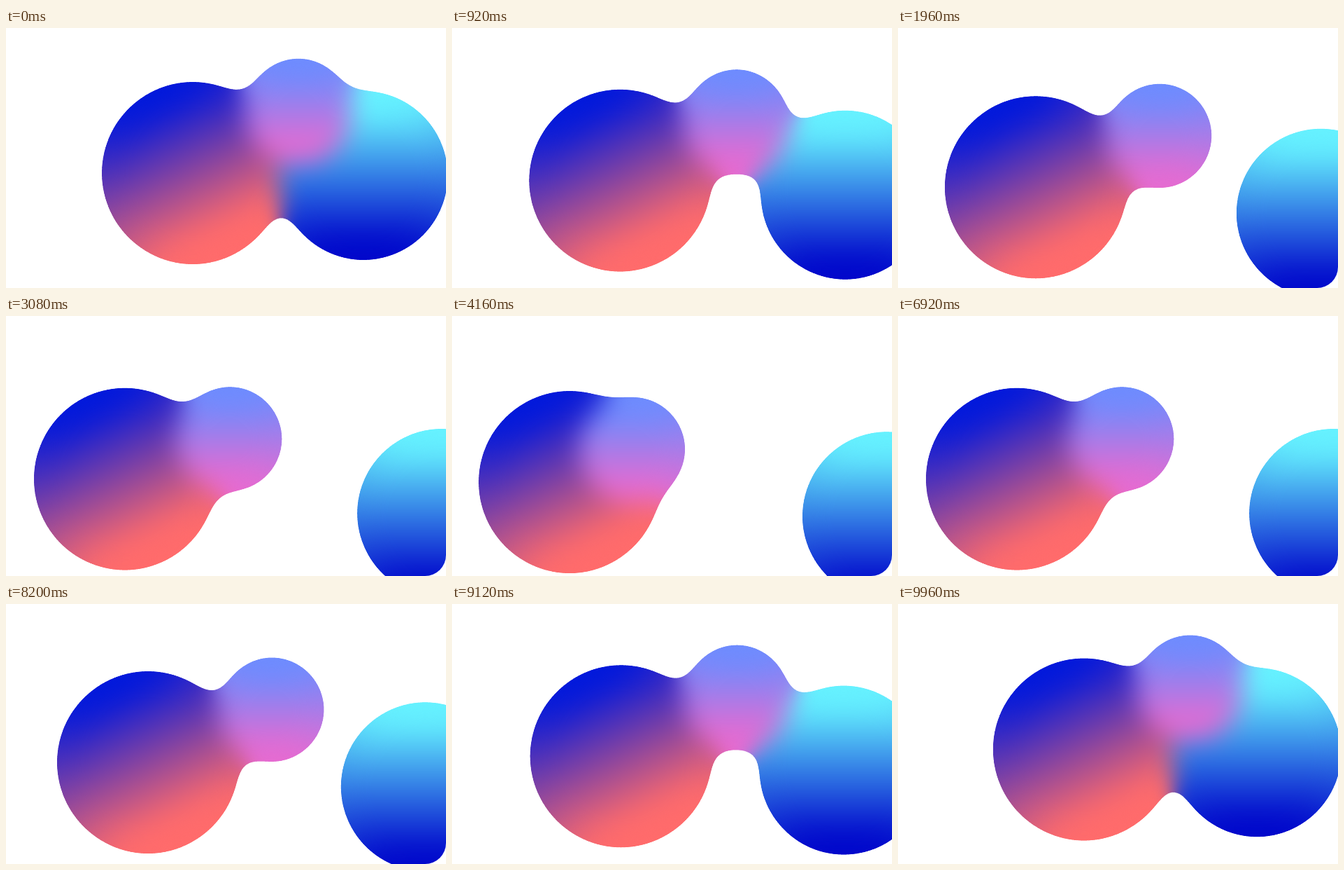
Write an HTML page that moves like this. It is 629 px wide and 371 px high and loops after 10000 ms.

```html
<!DOCTYPE html>
<html lang="en">
<head>
<meta charset="utf-8">
<title>Gooey blobs</title>
<style>
  html, body { margin: 0; width: 100%; height: 100%; overflow: hidden; background: #fff; }
  svg { display: block; width: 100vw; height: 100vh; border-radius: 0 0 30px 0; overflow: hidden; }
</style>
</head>
<body>
<svg viewBox="0 0 629 371">
  <defs>
    <!-- Gradients are in each blob's own coordinates, centred on 0,0 -->
    <linearGradient id="sunset" gradientUnits="userSpaceOnUse" x1="-45" y1="-97" x2="37" y2="79">
      <stop stop-color="#0018dc"/><stop offset="1" stop-color="#ff6b6b"/>
    </linearGradient>
    <linearGradient id="lilac" gradientUnits="userSpaceOnUse" x1="0" y1="-52" x2="0" y2="56">
      <stop stop-color="#6c8cff"/><stop offset="1" stop-color="#e86ad0"/>
    </linearGradient>
    <linearGradient id="ocean" gradientUnits="userSpaceOnUse" x1="0" y1="-92" x2="0" y2="96">
      <stop stop-color="#66f2ff"/><stop offset="1" stop-color="#0006cb"/>
    </linearGradient>
    <!-- Blur, then cut the alpha hard so that near shapes melt together -->
    <filter id="goo" filterUnits="userSpaceOnUse" x="-100" y="-100" width="980" height="620"
            color-interpolation-filters="sRGB">
      <feGaussianBlur stdDeviation="18"/>
      <feColorMatrix values="1 0 0 0 0  0 1 0 0 0  0 0 1 0 0  0 0 0 60 -29.5"/>
    </filter>
  </defs>
  <g filter="url(#goo)">
    <circle id="big" r="131.2" fill="url(#sunset)"/>
    <circle id="right" r="121.8" fill="url(#ocean)"/>
    <circle id="small" r="76.2" fill="url(#lilac)"/>
  </g>
</svg>
<script>
  const LOOP = 10000, STEP = 40;

  // Centre of each blob at every second of the outward half
  const paths = {
    big:   { x: [267, 237.5, 195.5, 171, 167, 179.5],
             y: [207, 218.5, 227.5, 232.3, 236.5, 239] },
    right: { x: [511, 566, 605.5, 622, 622.5, 612.5],
             y: [210.5, 240.5, 265, 280.7, 286, 281] },
    small: { x: [418, 405, 372.5, 324.5, 267, 220],
             y: [118, 135, 154.7, 174, 189, 192] }
  };

  // Catmull-Rom curve through k, with ends extended in a straight line
  function curve(k, s) {
    const last = k.length - 1;
    const at = i => i < 0 ? 2 * k[0] - k[1]
                  : i > last ? 2 * k[last] - k[last - 1] : k[i];
    const i = Math.min(Math.floor(s), last - 1), u = s - i;
    const a = at(i - 1), b = at(i), c = at(i + 1), d = at(i + 2);
    return b + u / 2 * (c - a + u * (2 * a - 5 * b + 4 * c - d + u * (3 * (b - c) + d - a)));
  }

  function draw(ms) {
    const t = Math.floor(ms % LOOP / STEP) * STEP;
    const s = Math.min(t, LOOP - t) / 1000;
    for (const id in paths) {
      const { x, y } = paths[id];
      document.getElementById(id).setAttribute('transform',
        `translate(${curve(x, s).toFixed(2)} ${curve(y, s).toFixed(2)})`);
    }
  }

  const start = performance.now();
  function tick() {
    draw(performance.now() - start);
    requestAnimationFrame(tick);
  }
  tick();
</script>
</body>
</html>
```
